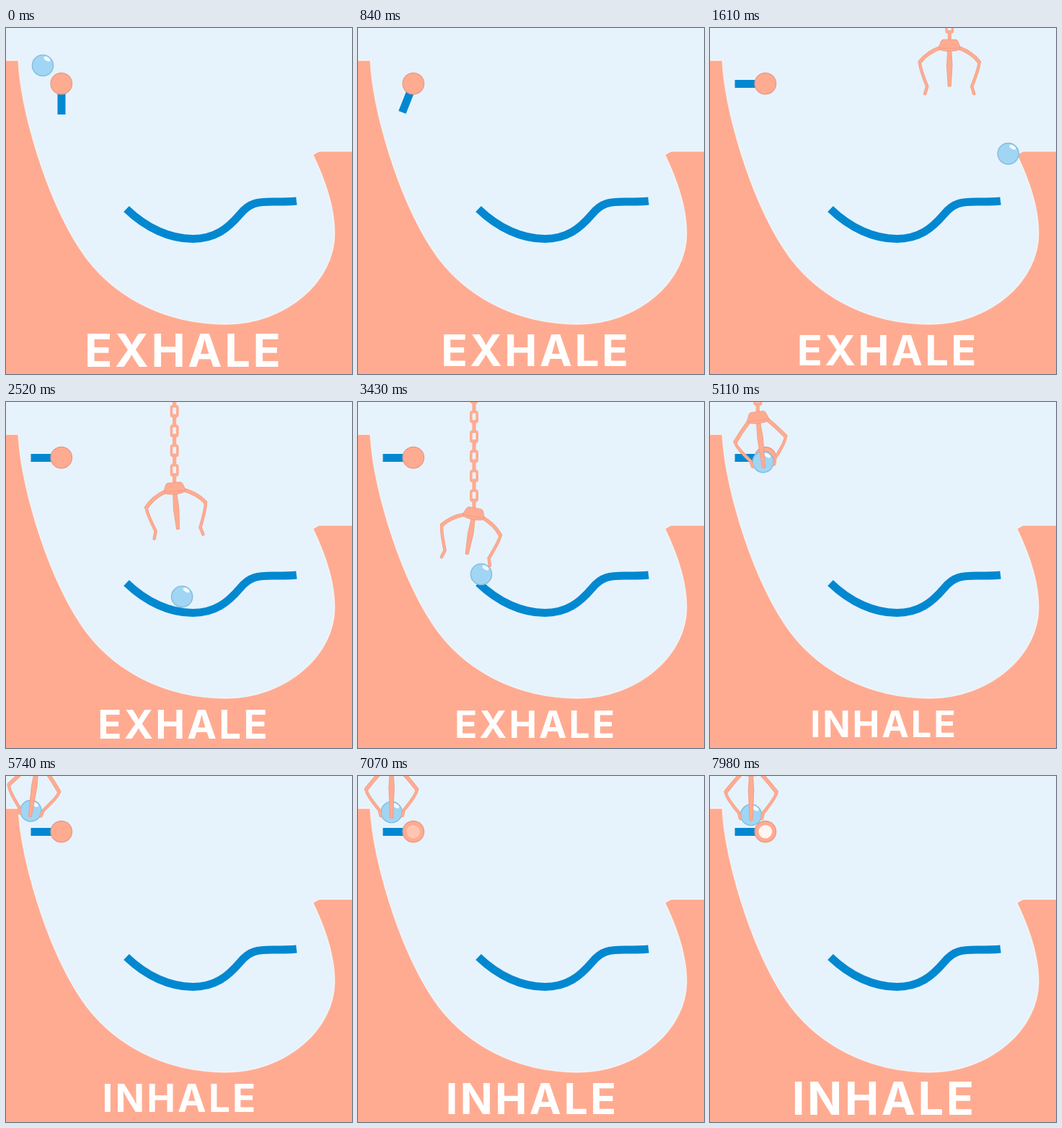
Write an HTML page with a canvas that moves like this. It is 480 px wide and 480 px high and loops after 8 s.

```html
<!DOCTYPE html>
<html lang="en">
<head>
<meta charset="utf-8">
<title>Breathe</title>
<style>
  html, body { margin: 0; width: 100%; height: 100%; overflow: hidden; background: #e6f3fc; }
  canvas { display: block; width: 100vw; height: 100vh; }
  svg { position: absolute; visibility: hidden; }
</style>
</head>
<body>
<canvas id="stage" width="480" height="480"></canvas>
<!-- Routes the ball's centre follows -->
<svg width="0" height="0">
  <path id="swoop" d="M51 52C60 230 160 395 300 395C400 395 440 330 440 285Q440 235 418 178Q425 60 480 -40"/>
  <path id="roll" d="M511 156H443Q418 156 413 177L394 221Q345 218 309 245C275 280 235 275 201 254Q188 246 181 238L171 239"/>
</svg>
<script>
const ctx = document.getElementById('stage').getContext('2d');
const swoop = document.getElementById('swoop');
const roll = document.getElementById('roll');

const LOOP = 8000, SWING = 1820, REACH = 62, GRAB = 3850;
const SKY = '#e6f3fc', SKIN = '#ffab91', SHADE = '#ed9a83', BLUE = '#0288d1';

const bowl = new Path2D('M-5 45H17C20 110 53 230 102 306C146 374 222 411 305 411' +
  'C390 411 456 350 456 285C456 245 440 205 426 176Q430 173 435 171H485V485H-5Z');
const rail = new Path2D('M167 251C195 278 228 292.5 259 292.5C290 292.5 308 278 325 258' +
  'C338 242 350 241 370 241C385 241 395 241 403 240');
const hub = new Path2D('M-8 -8H8Q11 -8 12 -5L15 3Q15 6 11 7L5 8H-5L-11 7Q-15 6 -15 3L-12 -5Q-11 -8 -8 -8Z');
const hubRim = new Path2D('M-14 3Q-9 5 -5 4H5Q10 5 14 3');

const ramp = (t, a, b) => Math.max(0, Math.min(1, (t - a) / (b - a)));
const smooth = u => u * u * (3 - 2 * u);
const ease = (t, a, b) => smooth(ramp(t, a, b));
const easeOut = (t, a, b) => Math.sin(ramp(t, a, b) * Math.PI / 2);
const mix = (a, b, u) => a + (b - a) * u;
const along = (path, u) => path.getPointAtLength(u * path.getTotalLength());
const wave = (t, zero) => Math.sin(2 * Math.PI * (t - zero) / SWING);

// Claw: comes down to the ball, lifts it to the top left, then drifts
function clawPose(t) {
  const dip = ease(t, 3430, GRAB), lift = ease(t, 4070, 5500);
  const drift = ramp(t, 5500, 7980) ** 3;
  const x = mix(340, 161, ease(t, 1350, 3430)) + 10 * dip;
  const y = mix(-90, 155, easeOut(t, 800, 3430)) + 22 * dip;
  const search = 10 * ramp(t, 1610, 3430) * (1 - dip) * wave(t, 2975);
  const carry = mix(21, 8, ramp(t, 4550, 5740)) * ease(t, 4070, 4550) * wave(t, 7070);
  return {
    x: mix(x, 43, lift) + 14 * drift,
    y: mix(y, -13, lift) + 5 * drift,
    tilt: (search + carry) * Math.PI / 180,
    grip: ease(t, 3500, GRAB)
  };
}

function ballPlace(t, claw) {
  if (t < 700) return along(swoop, ramp(t, 0, 650) ** 2);
  if (t < GRAB) return along(roll, easeOut(t, 1240, 3430));
  return { x: claw.x - REACH * Math.sin(claw.tilt), y: claw.y + REACH * Math.cos(claw.tilt) };
}

function strokePath(path, color, width) {
  ctx.strokeStyle = color;
  ctx.lineWidth = width;
  ctx.stroke(path);
}

function disc(x, y, r, fill, edge) {
  const p = new Path2D();
  p.arc(x, y, r, 0, Math.PI * 2);
  ctx.fillStyle = fill;
  ctx.fill(p);
  if (edge) strokePath(p, edge, 1.4);
}

function drawScene() {
  ctx.fillStyle = SKY;
  ctx.fillRect(0, 0, 480, 480);
  ctx.fillStyle = SKIN;
  ctx.fill(bowl);
  strokePath(bowl, 'rgba(255,255,255,.6)', 1.3);
  strokePath(rail, BLUE, 11);
}

function drawArm(t) {
  ctx.save();
  ctx.translate(77, 77.5);
  ctx.rotate(Math.PI / 2 * ease(t, 650, 1250));
  ctx.fillStyle = BLUE;
  ctx.fillRect(-5.5, 0, 11, 42.5);
  ctx.restore();
  disc(76.8, 77.2, 14.7, SKIN, SHADE);
  const glow = ramp(t, 6600, 8150);
  if (glow) disc(76.8, 77.2, 9.3, `rgba(255,255,255,${glow})`);
}

function drawBall({ x, y }) {
  disc(x, y, 14.6, '#a0d5f4', '#84bcdc');
  ctx.fillStyle = 'rgba(255,255,255,.85)';
  ctx.beginPath();
  ctx.ellipse(x + 6, y - 9, 5, 2.6, 0.55, 0, Math.PI * 2);
  ctx.fill();
}

function drawChain(x, y) {
  ctx.fillStyle = SKIN;
  for (let cy = y - 25; cy > -24; cy -= 27.3) {
    const link = new Path2D();
    link.roundRect(x - 4.2, cy - 7, 8.4, 14, 2);
    strokePath(link, SKIN, 3.6);
    ctx.fillRect(x - 2.6, cy + 4, 5.2, 17);
  }
}

function drawFinger(side, grip) {
  const ex = side * mix(41, 35, grip), ey = mix(23, 30, grip);
  const kx = side * mix(31, 17, grip), ky = mix(57, 59, grip);
  const upper = new Path2D(), lower = new Path2D();
  upper.moveTo(side * 12, 3);
  upper.quadraticCurveTo(ex - side * 10, ey - 13, ex, ey);
  lower.moveTo(ex, ey);
  lower.quadraticCurveTo(ex + side, ey + 6, kx, ky);
  lower.lineTo(kx + side * mix(3, -2, grip), 67);
  strokePath(lower, SHADE, 4.4);
  strokePath(upper, SHADE, 5.4);
  strokePath(lower, SKIN, 3.4);
  strokePath(upper, SKIN, 4.4);
}

function drawClaw({ x, y, tilt, grip }) {
  drawChain(x, y);
  ctx.save();
  ctx.translate(x, y);
  ctx.rotate(tilt);
  ctx.lineJoin = ctx.lineCap = 'round';
  drawFinger(-1, grip);
  drawFinger(1, grip);

  const middle = new Path2D(`M-2.5 6L-3.8 28L-2 ${mix(57, 70, grip)}H2L3.8 28L2.5 6Z`);
  for (const part of [middle, hub]) {
    ctx.fillStyle = SKIN;
    ctx.fill(part);
    strokePath(part, SHADE, 0.8);
  }
  strokePath(hubRim, SHADE, 0.8);
  ctx.restore();
}

function drawWord(word, x, scale, alpha) {
  ctx.save();
  ctx.translate(x, 447 + 23 * scale);
  ctx.scale(scale, scale);
  ctx.globalAlpha = alpha;
  ctx.fillStyle = '#fff';
  ctx.font = '700 63.3px Inter, "Open Sans", sans-serif';
  ctx.letterSpacing = '3.6px';
  ctx.textAlign = 'center';
  ctx.fillText(word, 1.8, 0);
  ctx.restore();
}

function draw(t) {
  const claw = clawPose(t);
  drawScene();
  drawArm(t);
  drawBall(ballPlace(t, claw));
  drawClaw(claw);
  drawWord('EXHALE', 245, 1 - t * 5.35e-5, 1 - ramp(t, 4130, 4400));
  drawWord('INHALE', 240, 1 - (LOOP - t) * 7e-5, ramp(t, 4760, 5040));
}

function frame() {
  draw(performance.now() % LOOP);
  requestAnimationFrame(frame);
}
frame();
</script>
</body>
</html>
```
